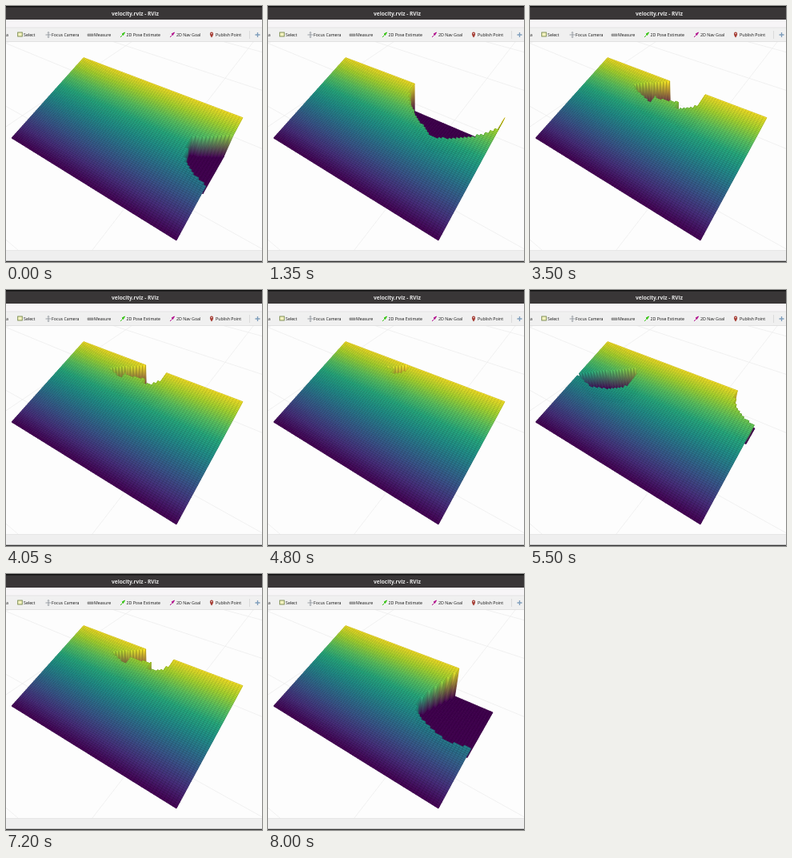
These frames come from a looping animation (320 by 320 pixels, 8050 ms). An HTML page with a canvas:

```html
<!DOCTYPE html>
<html lang="en">
<head>
<meta charset="utf-8">
<title>Velocity surface</title>
<style>
  html, body { margin: 0; width: 100%; height: 100%; overflow: hidden; background: #fdfdfd; }
  canvas, svg { position: absolute; left: 0; top: 0; width: 320px; height: 320px; display: block; }
  text { font: 5.25px "Open Sans", "Noto Sans", sans-serif; fill: #111; }
  .title { font-size: 6.6px; font-weight: 700; fill: #e8e8e8; text-anchor: middle; }
</style>
</head>
<body>
<canvas id="view"></canvas>
<svg viewBox="0 0 320 320">
  <rect width="320" height="28" fill="#f7f5f7"/>
  <rect width="320" height="17" fill="#393637"/>
  <rect width="320" height="1.5" fill="#111"/>
  <text class="title" x="161.5" y="11.5">velocity.rviz - RViz</text>
  <rect y="27" width="320" height="18" fill="#f0f0f0"/>
  <path d="M0 27H320M0 44.5H320" stroke="#dcdcdc" stroke-width=".7"/>
  <text x="0" y="38">a</text>
  <rect x="14.7" y="33" width="5.6" height="5" fill="#f4f3c0" stroke="#76864a" stroke-width=".9"/>
  <text x="22" y="38">Select</text>
  <path d="M53 32.5v7M49.5 36h7M52 33.5l1-1 1 1M52 38.5l1 1 1-1" fill="none" stroke="#8d949a" stroke-width=".9"/>
  <text x="57" y="38">Focus Camera</text>
  <path d="M102 35h7v2.5h-7z" fill="#a5a5a5" stroke="#666" stroke-width=".5"/>
  <text x="110" y="38">Measure</text>
  <path d="M143 39l2.5-2.5M145 35l3.5-2-2 3.5z" stroke="#38c516" fill="#38c516"/>
  <text x="150.5" y="38">2D Pose Estimate</text>
  <path d="M205 39l2.5-2.5M207 35l3.5-2-2 3.5z" stroke="#b3128f" fill="#b3128f"/>
  <text x="213" y="38">2D Nav Goal</text>
  <path d="M257 39.5q-2.5-3.5-2-5a2 2 0 0 1 4 0q.5 1.5-2 5z" fill="#a53b32"/>
  <circle cx="257" cy="34.5" r=".8" fill="#eee"/>
  <text x="262" y="38">Publish Point</text>
  <path d="M304.5 31v10" stroke="#d2d2d2" stroke-width=".7"/>
  <path d="M314.5 33v6M311.5 36h6" stroke="#7d9dbb" stroke-width="1.3"/>
  <rect y="305.5" width="320" height="13.5" fill="#efefef"/>
  <path d="M0 305.5H320" stroke="#dedede" stroke-width=".6"/>
  <rect y="318.7" width="320" height="1.3" fill="#333"/>
</svg>
<script>
const LOOP = 8050, STEP = 50, N = 68;
const canvas = document.getElementById('view');
const ctx = canvas.getContext('2d');
const dpr = window.devicePixelRatio || 1;
canvas.width = canvas.height = 320 * dpr;
ctx.scale(dpr, dpr);

// A hole opens between a and b, reaches down to v = d, and has a sharper corner for small k.
// It leans sideways, may have a raised middle (bump) and an upper limit (top).
const hole = p => ({ k: .25, lean: 0, bump: 0, top: 1.5, ...p });
const corner = hole({ a: .85, b: 1.15, d: .41, k: .1, top: .83 });
const wide = hole({ a: .505, b: 1, d: .62, k: .45 });
const deep = hole({ a: .255, b: .65, d: .56, k: .4 });
const twin = hole({ a: .255, b: .672, d: .735, bump: .07 });
const small = hole({ a: .21, b: .46, d: .85, bump: .05 });
const left = hole({ a: -.3, b: .255, d: .51, k: .2, lean: .3 });
const notch = hole({ a: .255, b: .622, d: .79, bump: .08 });
const right = hole({ a: .777, b: 1.3, d: .42, k: .12, lean: -.25 });
const side = hole({ a: .865, b: 1.3, d: .75, k: .3 });
const keys = [[0, corner], [1350, wide], [2350, deep], [2700, deep], [3500, twin], [4800, small],
  [5500, left], [6500, deep], [6800, deep], [7200, notch], [7550, notch], [8000, right], [LOOP, right]];

function holesAt(t) {
  const i = keys.findIndex(key => key[0] > t);
  const [t0, from] = keys[i - 1], [t1, to] = keys[i];
  const s = (t - t0) / (t1 - t0), main = {};
  for (const name in from) main[name] = from[name] + (to[name] - from[name]) * s;
  // The second hole slides in from the right edge and back out.
  const shift = Math.max(0, Math.abs(t - 5600) - 150) / 400 * .3;
  return [main, { ...side, a: side.a + shift, b: side.b + shift }];
}

function blocked(h, u, v) {
  const x = (u - h.lean * (1 - v) - h.a) / (h.b - h.a);
  if (x <= 0 || x >= 1 || v > h.top + .93 * (u - 1)) return false;
  const depth = (1 - h.d) * (1 - Math.abs(2 * x - 1)) ** h.k;
  return v > 1 - depth + (x > .42 && x < .78 ? h.bump : 0);
}

function project(u, v, z) {
  const w = 1 - .2723 * u + .2543 * v - .1055 * z;
  return { x: (7 + 148 * u + 120.94 * v - 16.5 * z) / w,
           y: (165 + 48.22 * u - 43.33 * v - 47.5 * z) / w, z };
}

const viridis = ['440154', '472d7b', '3b528b', '2c728e', '21918c', '27ad81', '5cc863', 'aadc32', 'fde725']
  .map(hex => [0, 2, 4].map(i => parseInt(hex.slice(i, i + 2), 16)));

function colour(z) {
  const s = Math.min(z, .9999) * (viridis.length - 1), i = Math.floor(s);
  return `rgb(${viridis[i].map((c, j) => Math.round(c + (viridis[i + 1][j] - c) * (s - i)))})`;
}

function line(a, b) {
  ctx.moveTo(a.x, a.y);
  ctx.lineTo(b.x, b.y);
}

function floor() {
  ctx.fillStyle = '#fdfdfd';
  ctx.fillRect(0, 0, 320, 320);
  ctx.beginPath();
  for (let k = -1; k < 4; k++) {
    const u = -.1 + .85 * k, v = .25 + .85 * k;
    line(project(u, -1, 0), project(u, 3.5, 0));
    line(project(-1.5, v, 0), project(2.5, v, 0));
  }
  ctx.strokeStyle = '#ebebeb';
  ctx.lineWidth = .7;
  ctx.stroke();
}

const mean = (ps, key) => ps.reduce((s, p) => s + p[key], 0) / ps.length;

function fillFor(quad) {
  const zs = quad.map(p => p.z), lo = Math.min(...zs), hi = Math.max(...zs);
  if (hi - lo < .1) return colour(mean(quad, 'z'));
  const cut = (lo + hi) / 2;
  const top = quad.filter(p => p.z > cut), low = quad.filter(p => p.z <= cut);
  const g = ctx.createLinearGradient(mean(top, 'x'), mean(top, 'y'), mean(low, 'x'), mean(low, 'y'));
  g.addColorStop(0, colour(hi));
  g.addColorStop(1, colour(lo));
  return g;
}

function stroke(style, width) {
  ctx.strokeStyle = style;
  ctx.lineWidth = width;
  ctx.stroke();
}

function draw(t) {
  floor();
  const holes = holesAt(t), pts = [];
  for (let j = 0; j <= N; j++) {
    for (let i = 0; i <= N; i++) {
      const u = i / N, v = j / N;
      pts.push(project(u, v, holes.some(h => blocked(h, u, v)) ? 0 : v));
    }
  }
  ctx.lineJoin = 'round';
  // Farthest cells first; the underlay stroke closes the seams.
  for (let j = N - 1; j >= 0; j--) {
    for (let i = 0; i < N; i++) {
      const a = j * (N + 1) + i, b = a + N + 1;
      const quad = [pts[a], pts[a + 1], pts[b + 1], pts[b]];
      ctx.beginPath();
      quad.forEach(p => ctx.lineTo(p.x, p.y));
      ctx.closePath();
      ctx.fillStyle = fillFor(quad);
      ctx.fill();
      stroke(ctx.fillStyle, .8);
      stroke('rgba(0,0,0,.32)', .45);
    }
  }
}

let last = -1;
function tick() {
  const t = Math.floor(performance.now() % LOOP / STEP) * STEP;
  if (t !== last) draw(last = t);
  requestAnimationFrame(tick);
}
tick();
</script>
</body>
</html>
```
